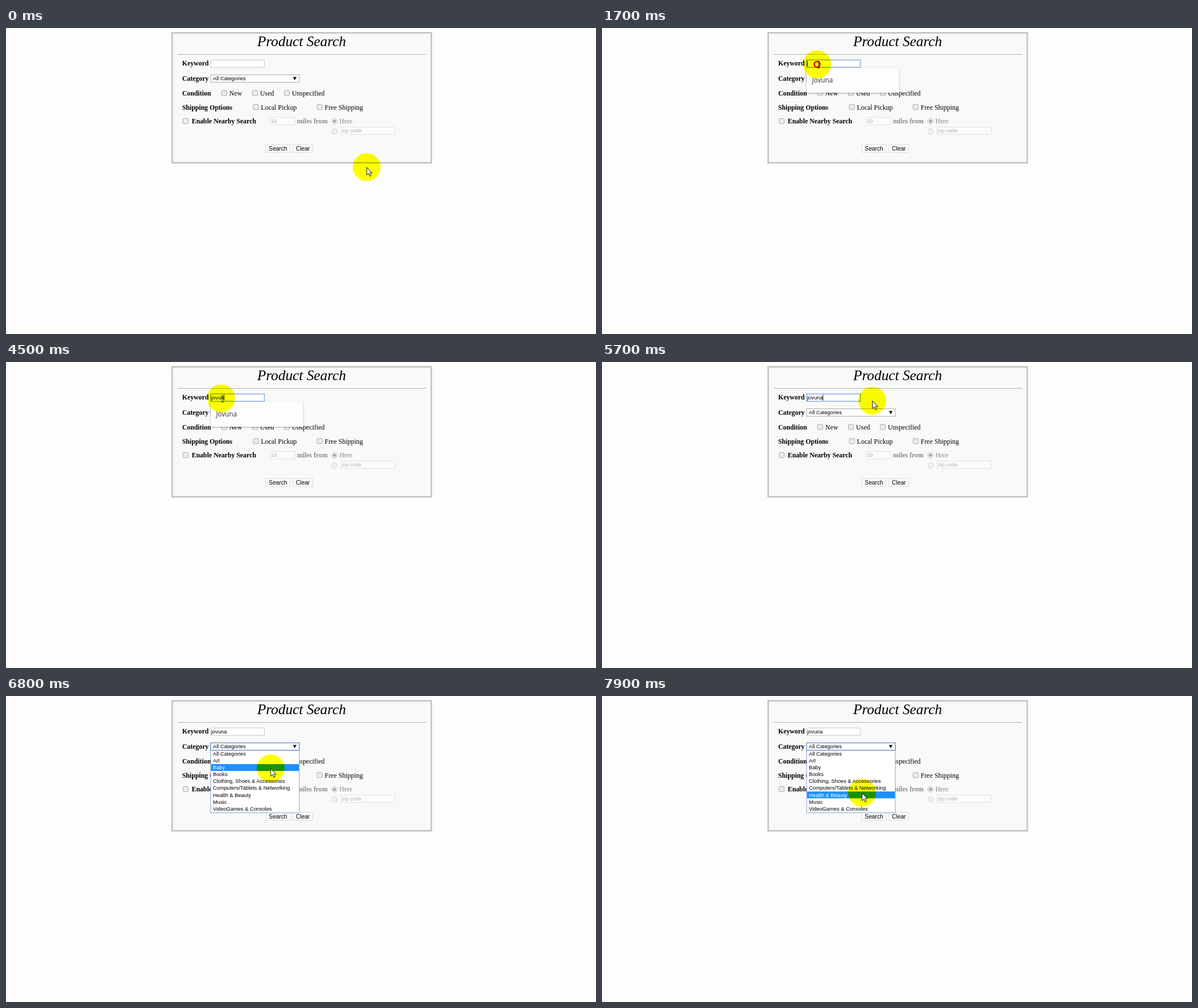
These frames come from a looping animation (1038x539 px, 8000 ms). An HTML page:

```html
<!DOCTYPE html>
<html lang="en">
<head>
<meta charset="utf-8">
<title>Product Search</title>
<style>
  html, body { margin: 0; width: 100%; height: 100%; overflow: hidden; background: #fdfdfb; }
  svg { display: block; width: 1038px; height: 539px; }
  text { white-space: pre; }
  .serif { font: 11.9px "Liberation Serif", serif; }
  .bold { font: bold 11.8px "Liberation Serif", serif; }
  .sans { font: 9.3px "Liberation Sans", sans-serif; }
  .button { font: 10.25px "Liberation Sans", sans-serif; }
  .title { font: italic 25.3px "Liberation Serif", serif; }
  .hint { font: 11.7px "Open Sans", sans-serif; }
  #halo { mix-blend-mode: multiply; }
</style>
</head>
<body>
<svg id="stage" viewBox="0 0 1038 539" xmlns="http://www.w3.org/2000/svg">
  <defs>
    <filter id="shadow" x="-10%" y="-30%" width="120%" height="160%">
      <feDropShadow dx="0" dy="1" stdDeviation="1.5" flood-color="#000" flood-opacity=".35"/>
    </filter>
  </defs>
  <rect width="1038" height="539" fill="#fdfdfb"/>
  <rect x="292.3" y="8.5" width="455.9" height="228.9" fill="#f9f9f8" stroke="#c2c2c3" stroke-width="2.6"/>
  <path d="M302 46.5H739" stroke="#b3b3ac"/>
  <g id="form"></g>
  <g id="popup">
    <rect x="360" y="70.5" width="162.5" height="43.5" fill="#fdfdfc" filter="url(#shadow)"/>
    <text class="hint" x="369.5" y="96" fill="#333">Jovuna</text>
  </g>
  <g id="menu"></g>
  <circle id="halo" r="24.5" fill="#ff0"/>
  <circle id="ring" fill="none" stroke="#e3120b" stroke-width="2.6"/>
  <path id="arrow" d="M0 0V13.2L3 10.4L5.2 15.4L7.4 14.4L5.3 9.6H9.4Z" fill="#fff" stroke="#111" stroke-width="1" stroke-linejoin="round"/>
  <path id="beam" d="M-2.5 -5.5H-.7L0 -5L.7 -5.5H2.5M0 -5V5M-2.5 5.5H-.7L0 5L.7 5.5H2.5" fill="none" stroke="#222" stroke-width="1"/>
</svg>
<script>
const $ = id => document.getElementById(id);
const LOOP = 8000, STEP = 100;
const WORD = 'jovuna';
const KEYS = [3500, 3600, 3800, 4200, 4400, 4700];
const CARET_OFF = [[2250, 2800], [3200, 3500], [5150, 5600]];
const FOCUS = 1400, HINT_ON = 1500, HINT_OFF = 5600, MENU_ON = 6300, SELECT = 6200;
const CLICKS = [1500, 6100], CLICK_TIME = 400;
const ROW = 12.05, MENU_TOP = 95.9;
const ITEMS = ['All Categories', 'Art', 'Baby', 'Books', 'Clothing, Shoes & Accessories',
  'Computers/Tablets & Networking', 'Health & Beauty', 'Music', 'VideoGames & Consoles'];
// time, x, y of the halo centre
const PATH = [
  [100, 634.5, 245], [600, 415, 106.5], [800, 379, 66], [1000, 394, 83], [1200, 378.5, 64],
  [5500, 378.5, 64], [5700, 475.5, 68], [6000, 496, 84.5], [6400, 496, 84.5],
  [6800, 465.5, 127.5], [7300, 459, 190], [7700, 457, 161.5], [7900, 457.3, 170.5]
];

const esc = s => s.replace(/&/g, '&amp;');
const text = (cls, x, y, s, fill = '#000', id = '') =>
  `<text class="${cls}" x="${x}" y="${y}" fill="${fill}"${id && ` id="${id}"`}>${esc(s)}</text>`;
const box = (x, y, w, h, stroke, fill = '#fff', id = '', r = 0) =>
  `<rect x="${x}" y="${y}" width="${w}" height="${h}" rx="${r}" fill="${fill}" stroke="${stroke}"${id && ` id="${id}"`}/>`;
const check = (x, y) => box(x - 4.5, y - 4.5, 9, 9, '#a9a9a7', '#ececea', '', 1.2);
const option = (x, y, label) => check(x, y) + text('serif', x + 9, y + 4.2, label);
const radio = (y, stroke, fill) => `<circle cx="578" cy="${y}" r="4.7" fill="${fill}" stroke="${stroke}"/>`;
const button = (x, w, label) =>
  box(x, 205, w, 14, '#dcdcda', '#fafaf9') + text('button', x + 5.3, 215.5, label);

$('form').innerHTML = [
  text('title', 442, 32.3, 'Product Search'),
  text('bold', 310, 66, 'Keyword'),
  box(360, 56.3, 94.5, 13, '#c9c9c9', '#fff', 'field'),
  text('sans', 361, 66, '', '#000', 'typed'),
  '<path id="caret" stroke="#111" stroke-width="1"/>',
  text('bold', 310, 92.7, 'Category'),
  box(360, 82.5, 156, 13, '#a9a9a9', '#fff', 'select'),
  text('sans', 364, 92.4, 'All Categories'),
  '<path d="M504.8 86.2H511.2L508 92Z" fill="#111"/>',
  text('bold', 310, 118.7, 'Condition'),
  option(383.8, 114.5, 'New'), option(438, 114.5, 'Used'), option(494, 114.5, 'Unspecified'),
  text('bold', 310, 143.5, 'Shipping Options'),
  option(439.5, 139.3, 'Local Pickup'), option(551.8, 139.3, 'Free Shipping'),
  check(316, 164), text('bold', 326.8, 168, 'Enable Nearby Search'),
  box(464.5, 157.5, 44, 13, '#e2e2e0', '#fbfbfa'),
  text('sans', 466, 167.4, '10', '#aaa'),
  text('bold', 512, 168, 'miles from', '#8a8a88'),
  radio(164.3, '#bbb', '#f0f0ee'), '<circle cx="578" cy="164.3" r="2.4" fill="#999"/>',
  text('serif', 586.5, 168, 'Here', '#8a8a88'),
  radio(182.3, '#d0d0ce', '#f1f1ef'),
  box(589.5, 174.5, 95, 13, '#e2e2e0', '#fbfbfa'),
  text('sans', 590.8, 184.2, 'zip code', '#b0b0ae'),
  button(457, 43, 'Search'), button(504.7, 35, 'Clear')
].join('');

$('menu').innerHTML = box(360, 96, 156, 109.7, '#84a3d3') +
  `<rect id="mark" x="360.5" width="155" height="${ROW}" fill="#1e90ff"/>` +
  ITEMS.map((s, i) => text('sans item', 364, MENU_TOP + ROW * i + 9.3, s)).join('');
const items = document.querySelectorAll('.item');

const show = (id, on) => $(id).setAttribute('visibility', on ? 'visible' : 'hidden');
const set = (id, attrs) => { for (const k in attrs) $(id).setAttribute(k, attrs[k]); };

function pointer(t) {
  const n = PATH.findIndex(p => p[0] > t);
  if (n === 0) return PATH[0].slice(1);
  if (n < 0) return PATH[PATH.length - 1].slice(1);
  const [t0, x0, y0] = PATH[n - 1], [t1, x1, y1] = PATH[n];
  const u = (t - t0) / (t1 - t0), e = u * u * (3 - 2 * u);
  return [x0 + (x1 - x0) * e, y0 + (y1 - y0) * e];
}

function drawField(t) {
  const focused = t >= FOCUS && t < SELECT;
  set('field', { stroke: focused ? '#84ade6' : '#c9c9c9', 'stroke-width': focused ? 1.5 : 1 });
  $('typed').textContent = WORD.slice(0, KEYS.filter(k => t >= k).length);
  const x = 361.3 + $('typed').getComputedTextLength();
  set('caret', { d: `M${x} 57.8V68` });
  show('caret', focused && !CARET_OFF.some(([a, b]) => t >= a && t < b));
}

function drawMenu(t, y) {
  const open = t >= MENU_ON;
  set('select', { stroke: t >= SELECT ? '#6f97d6' : '#a9a9a9', 'stroke-width': t >= SELECT ? 1.5 : 1 });
  show('menu', open);
  const row = Math.max(0, Math.min(ITEMS.length - 1, Math.floor((y + .7 - MENU_TOP) / ROW)));
  set('mark', { y: MENU_TOP + row * ROW });
  items.forEach((el, i) => el.setAttribute('fill', open && i === row ? '#fff' : '#000'));
}

function drawPointer(t, x, y) {
  const hx = x + .3, hy = y + .7;
  const inField = hx > 360 && hx < 455 && hy > 56 && hy < 70;
  set('halo', { cx: x, cy: y });
  set('arrow', { transform: `translate(${hx} ${hy})` });
  set('beam', { transform: `translate(${x + 2.3} ${y + 1})` });
  show('arrow', !inField);
  show('beam', inField);
  const click = CLICKS.find(c => t >= c && t < c + CLICK_TIME);
  show('ring', click !== undefined);
  if (click !== undefined) set('ring', { cx: x, cy: y, r: 3 + 4 * (t - click) / CLICK_TIME });
}

function draw(ms) {
  const t = Math.floor(ms % LOOP / STEP) * STEP;
  const [x, y] = pointer(t);
  drawField(t);
  show('popup', t >= HINT_ON && t < HINT_OFF);
  drawMenu(t, y);
  drawPointer(t, x, y);
}

let start;
function tick(now) {
  start ??= now;
  draw(now - start);
  requestAnimationFrame(tick);
}
draw(0);
requestAnimationFrame(tick);
</script>
</body>
</html>
```
